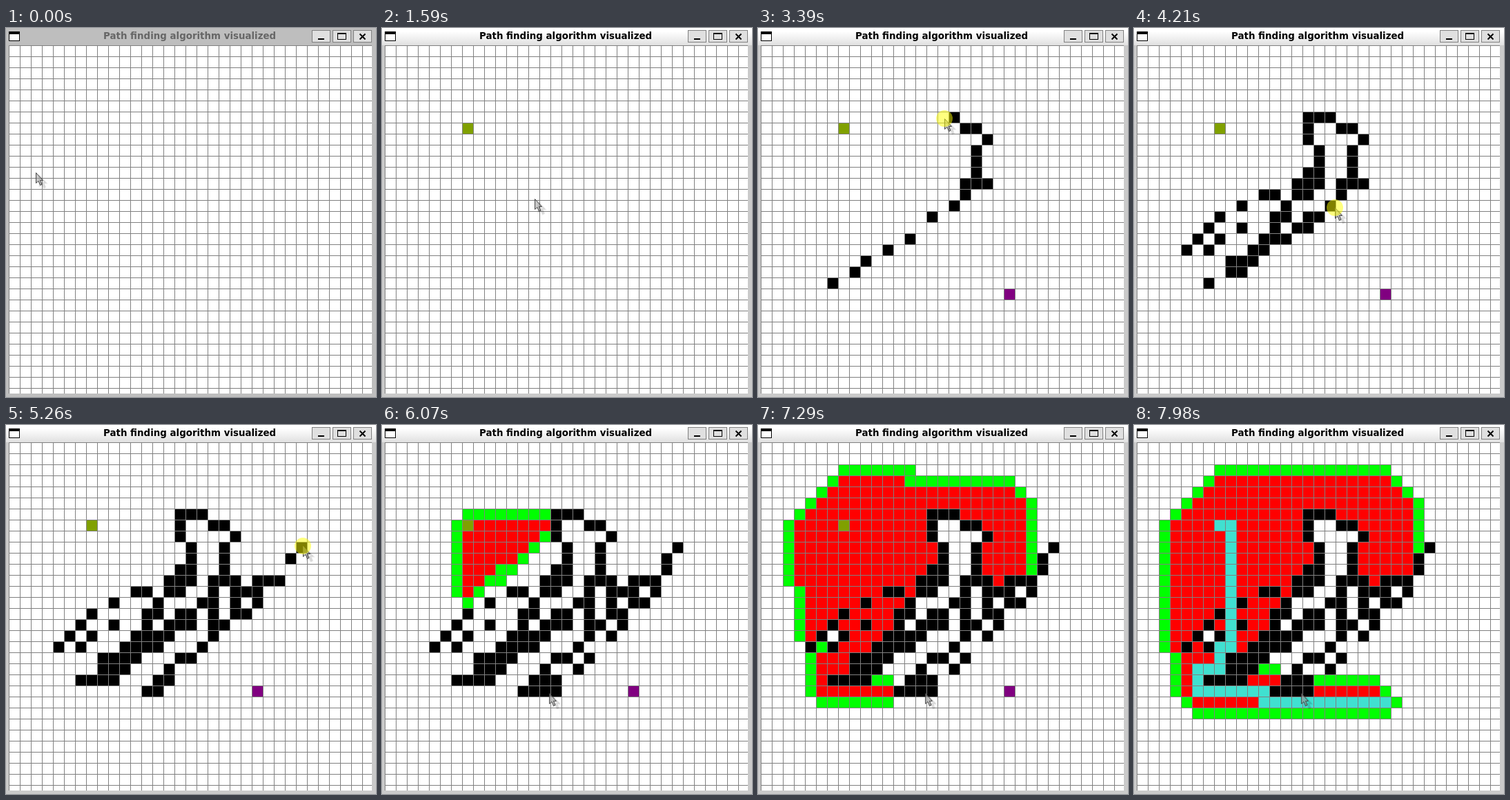
Animation of 536x534 px, one loop 8 s. Source, as an HTML page with a canvas:

```html
<!DOCTYPE html>
<html lang="en">
<head>
<meta charset="utf-8">
<title>Path finding algorithm visualized</title>
<style>
  html, body { margin: 0; width: 536px; height: 534px; overflow: hidden; }
  #win { position: relative; width: 536px; height: 534px; background: #bebebe; color: #666; }
  #win.active { background: #cacaca; color: #000; }
  #win.active #bar { background: linear-gradient(#fff 20%, #e0e0e0); }
  #bar { position: absolute; inset: 0 0 auto; height: 25px; }
  #bar svg, canvas { position: absolute; left: 0; top: 0; }
  canvas { left: 4px; top: 25px; }
  text { font: bold 13.4px "DejaVu Sans", sans-serif; fill: currentColor; }
</style>
</head>
<body>
<div id="win">
  <div id="bar">
    <svg width="536" height="25" shape-rendering="crispEdges">
      <rect x="4.5" y="5.5" width="15" height="13" fill="#fff" stroke="#000"/>
      <rect x="4" y="5" width="16" height="4"/>
      <g fill="#e0e0e0" stroke="#808080">
        <rect x="443.5" y="3.5" width="26" height="17"/>
        <rect x="473.5" y="3.5" width="26" height="17"/>
        <rect x="503.5" y="3.5" width="26" height="17"/>
      </g>
      <rect x="452" y="15" width="9" height="2"/>
      <rect x="480.5" y="7.5" width="12" height="9" fill="none" stroke="#000"/>
      <rect x="480" y="7" width="13" height="2"/>
      <path d="M512.5 8.5l8 8m0-8l-8 8" stroke="#000" stroke-width="2" shape-rendering="auto"/>
      <text x="141" y="16">Path finding algorithm visualized</text>
    </svg>
  </div>
  <canvas id="board" width="526" height="504"></canvas>
</div>
<script>
const LOOP = 8000, CELL = 16, LEFT = 4, TOP = 25, COLS = 33, ROWS = 32;
const START = [7, 7], GOAL = [22, 22];
const FOCUS_AT = 660, START_AT = 1230, GOAL_AT = 2060, DRAG_AT = 2600, DROP_AT = 5515;
const SEARCH_AT = 5830, SEARCH_RATE = .139, ROUTE_AT = 7692, ROUTE_RATE = .133;

const win = document.getElementById('win');
const ctx = document.getElementById('board').getContext('2d');
const id = (c, r) => r * COLS + c;

// Pointer track: [time, x, y]
const track = [
  [0, 43, 209], [20, 43, 209], [190, 97, 149], [310, 97, 149], [520, 140, 190], [840, 140, 190],
  [1070, 119, 148], [1425, 119, 148], [1820, 361, 383], [2330, 361, 383], [2590, 113, 369]
];

// The hand scribbles between turning points given in cells; each polled
// position becomes a wall, so a fast hand leaves gaps.
const walls = new Map();
let polls = [[6.3, 21]], pen = polls[0];

function stroke(stride, pts) {
  for (let i = 0; i < pts.length; i += 2) {
    const [c, r] = pen, dx = pts[i] - c, dy = pts[i + 1] - r;
    const n = Math.max(1, Math.floor(Math.max(Math.abs(dx), Math.abs(dy)) / stride));
    for (let k = 1; k <= n; k++) polls.push([c + dx * k / n, r + dy * k / n]);
    pen = [pts[i], pts[i + 1]];
  }
}
const slow = (...pts) => stroke(1, pts);
const brisk = (...pts) => stroke(1.5, pts);
const fast = (...pts) => stroke(2, pts);

// Spread the collected polls evenly over a span of time.
function spread(t0, t1) {
  polls.forEach(([c, r], i) => {
    const t = t0 + (t1 - t0) * i / (polls.length - 1);
    const key = id(Math.round(c), Math.round(r));
    track.push([t, 12 + CELL * c, 33 + CELL * r]);
    if (!walls.has(key)) walls.set(key, t);
  });
  polls = [pen];
}

slow(9,19); fast(17,14); slow(18,12, 20,12);
spread(DRAG_AT, 2840);

slow(19,11, 19,9, 20,8, 17,6.25);
spread(3050, 3373);

slow(15,6, 15.4,8, 16,12, 14,12); fast(12,13, 11,13, 7,15); slow(4,18);
fast(6,18, 7,17, 9,16, 12,15); slow(15,11, 15,13);
fast(12.9,14.8); slow(12,16.9, 10,18, 8,19, 9,20, 12.4,17, 17.3,14.25);
spread(3373, 4210);

fast(20,13); slow(22,12, 22,14, 18,16); fast(14,16.8); slow(9,21, 6.6,21, 18,13.8);
fast(22,12); slow(24,12); fast(18,17); slow(16,19); fast(14,21); slow(12,22, 15,19);
fast(17,18, 18,15, 24,12, 25,10, 26.2,8.8);
spread(4210, 5260);

brisk(25,11, 24,13, 15,21.3, 15,22, 14.4,22.2);
spread(5260, 5490);

// A* with Manhattan distance; ties go to the cell that was queued first,
// and a queued cell keeps its place even if a shorter way to it turns up.
const opened = new Map(), closed = new Map(), route = [];

function search() {
  const dist = (c, r) => Math.abs(c - GOAL[0]) + Math.abs(r - GOAL[1]);
  const start = id(...START), goal = id(...GOAL);
  const best = new Map([[start, 0]]), from = new Map();
  const queue = [{ c: START[0], r: START[1], f: dist(...START), n: 0 }];
  for (let turn = 1, n = 1; queue.length; turn++) {
    queue.sort((a, b) => a.f - b.f || a.n - b.n);
    const { c, r } = queue.shift(), here = id(c, r);
    if (here === goal) break;
    const g = best.get(here) + 1;
    for (const [dx, dy] of [[1, 0], [-1, 0], [0, 1], [0, -1]]) {
      const x = c + dx, y = r + dy, key = id(x, y);
      if (x < 0 || y < 0 || x >= COLS || y >= ROWS || walls.has(key)) continue;
      if (g >= (best.get(key) ?? Infinity)) continue;
      if (!best.has(key)) {
        opened.set(key, turn);
        queue.push({ c: x, r: y, f: g + dist(x, y), n: n++ });
      }
      best.set(key, g);
      from.set(key, here);
    }
    closed.set(here, turn + 1);
  }
  for (let key = from.get(goal); key !== undefined; key = from.get(key)) route.push(key);
}
search();

function pointer(t) {
  const i = track.findIndex(k => k[0] > t);
  if (i < 0) return track[track.length - 1].slice(1).map(Math.round);
  const [t0, x0, y0] = track[i - 1], [t1, x1, y1] = track[i];
  const p = (t - t0) / (t1 - t0);
  return [Math.round(x0 + (x1 - x0) * p), Math.round(y0 + (y1 - y0) * p)];
}

const pressed = t => (t >= DRAG_AT && t < DROP_AT) ||
  [FOCUS_AT, START_AT, GOAL_AT].some(at => t >= at && t < at + 70);

const arrow = new Path2D('M.5 .5V15.5L4 12.5L6.7 18.5L9 17.3L6.5 11.5H10.5Z');

function drawPointer(t) {
  const [x, y] = pointer(t);
  ctx.save();
  ctx.translate(x, y);
  ctx.save();
  ctx.translate(5, 4);
  ctx.fillStyle = ctx.strokeStyle = 'rgba(0,0,0,.09)';
  ctx.lineWidth = 2;
  ctx.fill(arrow);
  ctx.stroke(arrow);
  ctx.restore();
  ctx.fillStyle = 'rgba(155,155,155,.55)';
  ctx.strokeStyle = '#484848';
  ctx.lineWidth = 1;
  ctx.fill(arrow);
  ctx.stroke(arrow);
  if (pressed(t)) {
    ctx.fillStyle = 'rgba(255,255,0,.5)';
    ctx.beginPath();
    ctx.arc(0, 0, 12, 0, 7);
    ctx.fill();
  }
  ctx.restore();
}

function fillCell(key, color) {
  ctx.fillStyle = color;
  ctx.fillRect(LEFT + CELL * (key % COLS), TOP + CELL * Math.floor(key / COLS), CELL, CELL);
}

function draw(t) {
  win.classList.toggle('active', t >= FOCUS_AT);
  ctx.setTransform(1, 0, 0, 1, -LEFT, -TOP);
  ctx.fillStyle = '#fff';
  ctx.fillRect(LEFT, TOP, 526, 504);

  if (t >= GOAL_AT) fillCell(id(...GOAL), '#800080');
  walls.forEach((at, key) => t >= at && fillCell(key, '#000'));
  const turn = Math.floor((t - SEARCH_AT) * SEARCH_RATE);
  opened.forEach((at, key) => {
    if (closed.get(key) <= turn) fillCell(key, '#f00');
    else if (at <= turn) fillCell(key, '#0f0');
  });
  if (t >= START_AT) fillCell(id(...START), '#80a000');
  const found = Math.max(0, Math.floor((t - ROUTE_AT) * ROUTE_RATE));
  route.slice(0, found).forEach(key => fillCell(key, '#40e0d0'));

  ctx.fillStyle = '#808080';
  for (let i = 0; i < COLS; i++) ctx.fillRect(LEFT + CELL * i, TOP, 1, 504);
  for (let i = 0; i < ROWS; i++) ctx.fillRect(LEFT, TOP + CELL * i, 526, 1);
  drawPointer(t);
}

const begin = performance.now();
function tick() {
  draw((performance.now() - begin) % LOOP);
  requestAnimationFrame(tick);
}
tick();
</script>
</body>
</html>
```
